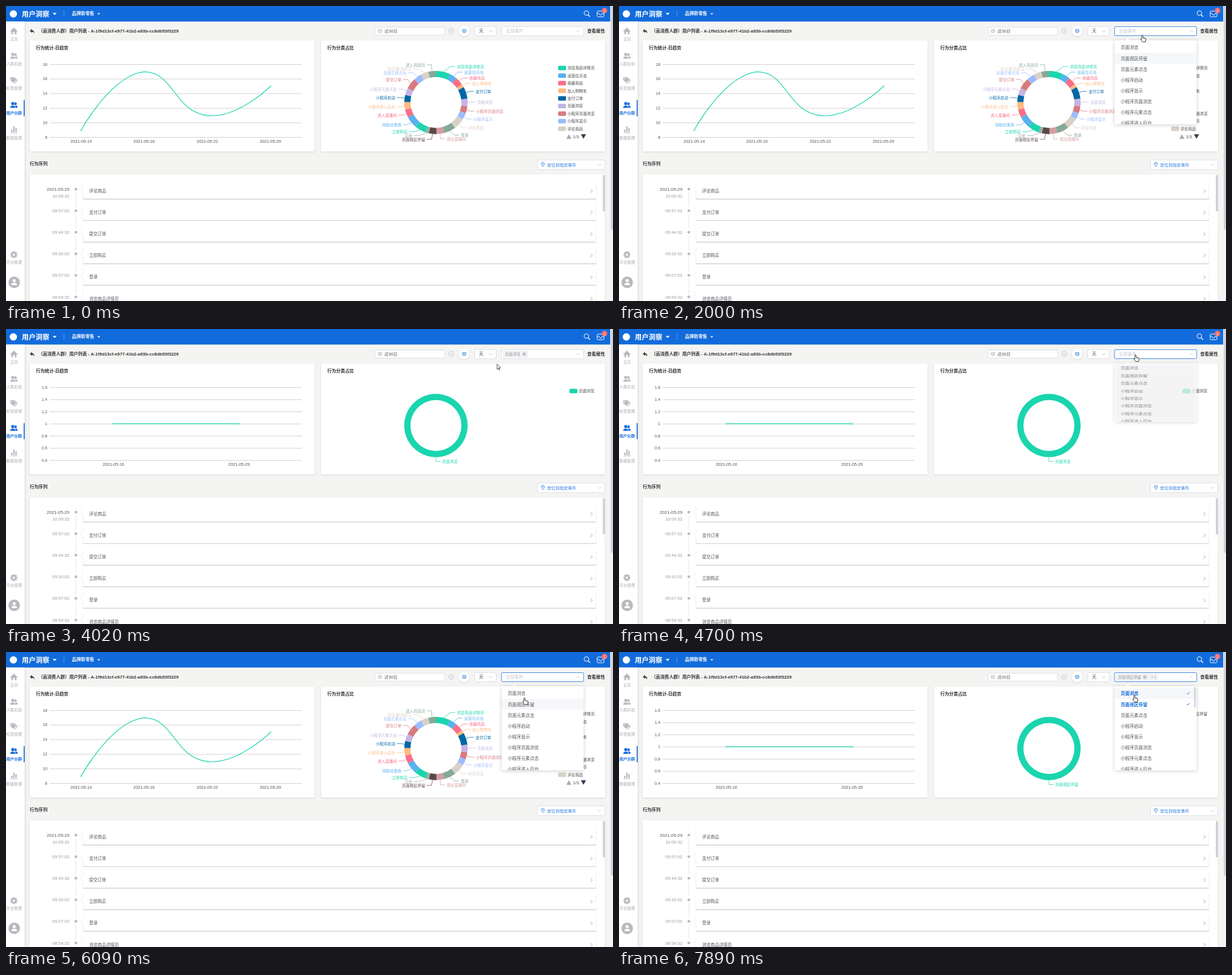
Animation of 1073x522 px, one loop 8 s. Source, as an HTML page with a canvas:

```html
<!DOCTYPE html>
<html lang="zh-CN">
<head>
<meta charset="utf-8">
<style>
html, body { margin: 0; width: 100%; height: 100%; overflow: hidden; background: #f4f4f3 }
canvas { display: block }
</style>
</head>
<body>
<canvas id="stage" width="1073" height="522"></canvas>
<script>
const c = document.getElementById('stage').getContext('2d');
const LOOP = 8000, BLUE = '#126bdb', TEAL = '#1ad5ae', GREY = '#b8babd', TEXT = '#505256';
const FONT = '"Liberation Sans", "Noto Sans CJK SC", "Noto Sans CJK", sans-serif';

const lerp = (a, b, p) => a + (b - a) * p;
const clamp = p => Math.max(0, Math.min(1, p));
const smooth = p => p * p * (3 - 2 * p);
const cubicOut = (t, start) => 1 - (1 - clamp((t - start) / 300)) ** 3;

function text(s, x, y, size, color, align = 'left', weight = 400) {
  c.font = `${weight} ${size}px ${FONT}`;
  c.textAlign = align;
  c.fillStyle = color;
  c.fillText(s, x, y + size * .37);
}
function rect(x, y, w, h, fill, r = 0, stroke) {
  c.beginPath();
  c.roundRect(x, y, w, h, r);
  if (fill) { c.fillStyle = fill; c.fill(); }
  if (stroke) { c.strokeStyle = stroke; c.lineWidth = 1; c.stroke(); }
}
function circle(x, y, r, fill, stroke, width = 1) {
  c.beginPath();
  c.arc(x, y, r, 0, 7);
  if (fill) { c.fillStyle = fill; c.fill(); }
  if (stroke) { c.strokeStyle = stroke; c.lineWidth = width; c.stroke(); }
}
function path(d, x, y, fill, stroke, width = 1) {
  const p = new Path2D(d);
  c.save();
  c.translate(x, y);
  if (fill) { c.fillStyle = fill; c.fill(p); }
  if (stroke) { c.strokeStyle = stroke; c.lineWidth = width; c.stroke(p); }
  c.restore();
}
function shadowed(blur, color, draw) {
  c.save();
  c.shadowBlur = blur;
  c.shadowColor = color;
  c.shadowOffsetY = 1;
  draw();
  c.restore();
}
const chevron = (x, y, up) => path(up ? 'M-3 1.5L0-1.5L3 1.5' : 'M-3-1.5L0 1.5L3-1.5', x, y, null, '#c0c4cc', .9);
const card = (x, y, w, h) => shadowed(3, 'rgba(0,0,0,.13)', () => rect(x, y, w, h, '#fff', 1));
const calendar = (x, y, color) => {
  rect(x - 3, y - 2.5, 6, 5, null, .5, color);
  path('M-3-.6H3M-1.5 1H1.5', x, y, null, color, .7);
};

// ---- static page ----
function people(x, y, color) {
  circle(x + 2.5, y - 2, 2.5, color);
  path('M2 5Q2 1 4 1Q6.5 1.5 6.5 5Z', x, y, color);
  circle(x - 2, y - 2.3, 3.2, color, '#fff', .7);
  path('M-7 5.5Q-6.5 1 -2 1Q2.5 1 3 5.5Z', x, y, color, '#fff', .5);
}
function header() {
  rect(0, 0, 1068, 27.5, BLUE);
  circle(13, 14, 6.5, '#fff');
  text('用户洞察', 28, 14, 12.2, '#fff', 'left', 700);
  path('M-3.5-1.7H3.5L0 2Z', 86, 14, '#fff');
  rect(102, 8, 1, 11, '#5a98e8');
  text('品牌新零售', 116.5, 13.5, 7.9, '#fff', 'left', 700);
  path('M-2.5-1.2H2.5L0 1.5Z', 164, 14, '#fff');
  circle(1026, 12.5, 4, null, '#fff', 1.1);
  path('M0 0L3.5 3.5', 1029, 15.5, null, '#fff', 1.5);
  rect(1045, 9, 12, 10, null, 1.5, '#fff');
  path('M0 0H3Q4 3 6 3Q8 3 9 0H12', 1045, 13, null, '#fff');
  circle(1058, 8, 5, '#f56c6c');
  text('1', 1058, 8, 7, '#fff', 'center');
}
function sidebar() {
  shadowed(4, 'rgba(0,0,0,.2)', () => rect(0, 27.5, 33, 500, '#fff'));
  path('M-7 1L0-6L7 1H4.5V6H1.5V2H-1.5V6H-4.5V1Z', 14, 44, GREY);
  people(14, 88, GREY);
  path('M-5.5-5H0L5 0L0 5L-5.5 0Z', 13, 131, GREY);
  path('M1-5L7 .5L2 6', 13, 131, null, GREY, 1.2);
  circle(10, 128.5, 1, '#fff');
  people(14, 175, BLUE);
  path('M-6 6H6V5H-6ZM-5 4V0H-2.5V4ZM-1.2 4V-6H1.2V4ZM2.5 4V-3H5V4Z', 14, 219, GREY);
  c.save();
  c.translate(14, 440);
  for (let i = 0; i < 8; i++) { c.rotate(Math.PI / 4); rect(-1.4, -6.3, 2.8, 4, GREY); }
  c.restore();
  circle(14, 440, 3.3, null, GREY, 2.8);
  circle(14.5, 489, 10.2, GREY);
  circle(14.5, 486, 2.8, '#fff');
  path('M-5 5Q-5 .7 0 .7Q5 .7 5 5Z', 14.5, 489, '#fff');
  [['主页', 58], ['人群实验', 102], ['标签管理', 145.5], ['用户分群', 189], ['数据管理', 233], ['平台管理', 453.5]]
    .forEach(([s, y]) => text(s, 14.3, y, 6.9, y == 189 ? BLUE : '#aaa', 'center', y == 189 ? 700 : 400));
  rect(31.3, 166.5, 1.7, 28.5, BLUE);
}
function toolbar() {
  path('M-4-1L0-4.5V-2.2Q4-2 4 3.2Q2.5.5 0 .5V2.6Z', 46, 45, '#444');
  text('（高消费人群）用户列表', 57.2, 44, 7.8, '#333', 'left', 700);
  text('- A-1f9d13cf-e977-41b2-a93b-cc8db53f3229', 145, 44, 7.85, '#333', 'left', 700);
  rect(652.5, 37.5, 123, 14, '#fff', 1.5, '#dcdfe6');
  calendar(661, 44, '#b4b8c0');
  text('近30日', 669, 44.3, 7.4, TEXT);
  circle(787, 44, 4.6, null, '#c0c4cc', .9);
  path('M-1.8-1.8L1.8 1.8M1.8-1.8L-1.8 1.8', 787, 44, null, '#c0c4cc', .9);
  shadowed(3, 'rgba(0,0,0,.12)', () => circle(810, 44, 9.5, '#fff'));
  calendar(810, 44, '#3c86e4');
  rect(828.5, 36.5, 38, 16, '#fff', 1.5, '#dcdfe6');
  text('天', 836, 44.3, 8, TEXT);
  chevron(857, 44.5);
  text('查看属性', 1027.5, 44.3, 7.8, '#333', 'left', 700);
}
function timeline() {
  text('行为序列', 42, 279, 7.8, '#333', 'left', 700);
  rect(939.5, 272.5, 119, 17, '#fff', 1.5, '#dcdfe6');
  path('M0 4Q-3 .5-3-1A3 3 0 0 1 3-1Q3 .5 0 4Z', 949, 280.5, null, '#3c86e4', .9);
  circle(949, 279.5, 1, null, '#3c86e4', .7);
  text('定位到指定事件', 956.5, 281, 7.35, '#2b78df');
  chevron(1049.5, 281);
  card(42, 298, 1016.5, 240);
  rect(123, 317, 1, 205, '#e2e5ea');
  text('2021-05-29', 112, 324, 7.8, TEXT, 'right');
  [['10:09:32', '评论商品'], ['09:57:02', '支付订单'], ['09:44:32', '提交订单'], ['09:32:02', '立即购买'],
   ['09:07:02', '登录'], ['08:54:32', '浏览商品详情页']].forEach(([time, name], i) => {
    const y = 324 + 38.15 * i;
    rect(121, y - 6, 5, 12, '#fff');
    circle(123.5, y, 2.5, '#bcbec2');
    text(time, 112, i ? y : y + 12, 7.7, '#999', 'right');
    path('M0-10V-4.5L-4.5 0L0 4.5V17M907-10V17', 136, y, null, '#ebebeb', .8);
    rect(136, y + 17, 907, 1.2, '#c9c9c9');
    text(name, 147, y + 3, 7.5, TEXT);
    path('M-1.5-3L1.5 0L-1.5 3', 1035, y + 3.3, null, '#999', .9);
  });
  rect(1055, 299, 3.7, 64.5, '#cdd0d6', 2);
}

// ---- line chart ----
const ALL = [[133, 219.5], [244, 116.4], [356, 193.8], [467.3, 142.2]];
const ONE = [[190, 167.6], [412, 167.6]];
const DATES = ['2021-05-14', '2021-05-16', '2021-05-22', '2021-05-29'];
const mix = (a, b, p) => [lerp(a[0], b[0], p), lerp(a[1], b[1], p)];

function curve(pts) {
  const low = v => Math.max(116.4, Math.min(219.5, v));
  let [ax, ay] = pts[0];
  c.beginPath();
  c.moveTo(ax, ay);
  for (let i = 1; i < pts.length; i++) {
    const p = pts[i], q = pts[i - 1], n = pts[i + 1];
    if (!n) { c.bezierCurveTo(ax, ay, ...p, ...p); break; }
    const before = Math.hypot(p[0] - q[0], p[1] - q[1]), after = Math.hypot(n[0] - p[0], n[1] - p[1]);
    const k = after / (after + before) / 2, vx = n[0] - q[0], vy = n[1] - q[1];
    c.bezierCurveTo(ax, ay, p[0] - vx * (.5 - k), low(p[1] - vy * (.5 - k)), ...p);
    ax = p[0] + vx * k;
    ay = low(p[1] + vy * k);
  }
  c.strokeStyle = TEAL;
  c.lineWidth = 1.2;
  c.stroke();
}
function lineChart(all, p) {
  const steps = all ? 5 : 6;
  for (let i = 0; i <= steps; i++) {
    const y = 103.5 + 129 * i / steps;
    rect(77.5, y - .5, 445.5, 1, '#d0d0d0');
    text(all ? 18 - 2 * i : +(1.6 - .2 * i).toFixed(1), 73, y - .5, 7.2, TEXT, 'right');
  }
  const date = (s, x) => text(s, x, 239.5, 7.4, TEXT, 'center');
  const dot = ([x, y], r = 1.4) => circle(x, y, r, '#fff', TEAL, .8);
  if (all) {
    const pts = ALL.map((q, i) => i % 2 ? mix(ONE[i >> 1], q, p) : q);
    curve(pts);
    pts.forEach(q => dot(q));
    DATES.forEach((s, i) => date(s, i < 2 ? lerp(ONE[i][0], ALL[i][0], p) : ALL[i][0]));
  } else {
    const pts = ONE.map((q, i) => mix(ALL[2 * i + 1], q, p));
    curve(pts);
    pts.forEach(q => dot(q));
    if (p < 1) [ALL[0], ALL[2]].forEach(q => dot(q, 1 - p));
    [DATES[1], DATES[3]].forEach((s, i) => date(s, lerp(ALL[i][0], ONE[i][0], p)));
  }
}

// ---- donut chart ----
const COLORS = [TEAL, '#5ab1ef', '#fa6e86', '#ffb980', '#0067a6', '#c4b4e4', '#d87a80', '#9cbbff', '#d9d0c7',
  '#87a997', '#d49ea2', '#5b4947', '#9cae a6'.replace(' ', '')];
// name, end angle in degrees clockwise from the top, label x and y
const SLICES = [
  ['浏览商品详情页', 27, 797, 107], ['运营位点击', 40, 810, 117], ['收藏商品', 55, 819, 127.5],
  ['加入购物车', 61, 824, 137], ['支付订单', 83, 830, 151], ['页面浏览', 97, 833, 170],
  ['小程序页面浏览', 110, 831, 186], ['小程序显示', 122, 826, 200], ['评论商品', 143, 817, 215.5],
  ['登录', 165, 804, 228.5], ['退出直播间', 179, 779, 235], ['页面视区停留', 193, 741, 236],
  ['注册', 199, 718, 229.5], ['立即购买', 220, 710, 222.5], ['领取优惠券', 242, 699, 210],
  ['进入直播间', 257, 691, 193], ['小程序进入后台', 271, 688, 178], ['小程序启动', 284, 688, 162],
  ['小程序元素点击', 297, 691, 147], ['提交订单', 317, 699, 130], ['页面元素点击', 332, 708, 118],
  ['关注/取消关注', 346, 717, 111], ['进入商品页', 360, 741, 104]];
const N = SLICES.length, CX = 760, CY = 170.7;

function slot(k) {
  const i = k % N, turn = k < N ? 0 : 360, s = SLICES[i];
  return { a: (i ? SLICES[i - 1][1] : 0) + turn, b: s[1] + turn, x: s[2], y: s[3], side: s[2] > CX ? 1 : -1 };
}
const blend = (f, g, p) => ({
  a: lerp(f.a, g.a, p), b: lerp(f.b, g.b, p), x: lerp(f.x, g.x, p), y: lerp(f.y, g.y, p), side: g.side
});
function slice(name, s, color) {
  const rad = d => (d - 90) * Math.PI / 180, mid = rad((s.a + s.b) / 2);
  c.beginPath();
  c.moveTo(CX + 56 * Math.cos(mid), CY + 56 * Math.sin(mid));
  c.lineTo(s.x - 11 * s.side, s.y);
  c.lineTo(s.x - 3 * s.side, s.y);
  c.strokeStyle = color;
  c.lineWidth = .8;
  c.stroke();
  text(name, s.x, s.y, 6.86, color, s.side > 0 ? 'left' : 'right');
  c.beginPath();
  c.arc(CX, CY, 56, rad(s.a), rad(s.b));
  c.arc(CX, CY, 45, rad(s.b), rad(s.a), true);
  c.fillStyle = color;
  c.fill();
}
const FULL = { a: 0, b: 360, x: 771, y: 234.5, side: 1 };

function legend(names, x) {
  names.forEach((name, i) => {
    const y = 109.7 + 13.45 * i;
    rect(x, y - 4, 14, 8, COLORS[i], 2);
    text(name, x + 16.5, y, 6.86, '#444');
  });
}
function donut(t, all, p) {
  if (!all) {
    const late = t >= 6820, name = SLICES[late ? 11 : 5][0];
    slice(name, blend(slot(late ? 16 : 5), FULL, p), TEAL);
    legend([name], 1023.5 - 6.86 * name.length);
    return;
  }
  const turn = cubicOut(t, 6430);
  SLICES.forEach(([name], i) => {
    let s = blend(slot(i), slot(i + 5), turn);
    if (!turn) s = slot(i);
    if (p < 1) {
      if (i == 5) s = blend(FULL, s, p);
      else s.b = lerp(s.a, s.b, p);
    }
    slice(name, s, COLORS[i % 13]);
  });
  legend(SLICES.slice(0, 9).map(s => s[0]), 976);
  path('M-4.5 4L0-4L4.5 4Z', 995, 231, '#aaa');
  text('1/3', 1002.5, 231, 7.4, '#444');
  path('M-4.5-4L0 4L4.5-4Z', 1020.8, 231, '#2f3f50');
}
function charts(t) {
  card(42, 61, 503.5, 196.5);
  card(557, 61, 502, 196.5);
  text('行为统计-日趋势', 53, 74.5, 7.8, '#333', 'left', 700);
  text('行为分类占比', 568, 74.5, 7.8, '#333', 'left', 700);
  const all = t < 3390 || t >= 5580 && t < 6820;
  const p = t < 3390 ? 1 : cubicOut(t, t < 5580 ? 3390 : t < 6820 ? 5580 : 6820);
  lineChart(all, p);
  donut(t, all, p);
}

// ---- event picker ----
const OPTIONS = ['页面浏览', '页面视区停留', '页面元素点击', '小程序启动', '小程序显示', '小程序页面浏览', '小程序元素点击', '小程序进入后台'];

function picker(t) {
  const chosen = t < 2300 ? [] : t < 4510 ? [0] : t < 6330 ? [] : t < 7830 ? [1] : [1, 0];
  const open = t >= 1400 && t < 3270 || t >= 4510;
  rect(876, 36.5, 145, 16, '#fff', 1.5, open ? '#3f85e3' : '#dcdfe6');
  if (chosen.length) {
    const name = OPTIONS[chosen[0]], w = name.length * 6.86;
    rect(879.5, 39, w + 15, 11, '#f4f4f5', 1.5, '#e9e9eb');
    text(name, 882, 44.3, 6.86, '#909399');
    circle(888.5 + w, 44.3, 3.1, '#b6b9be');
    path('M-1.2-1.2L1.2 1.2M1.2-1.2L-1.2 1.2', 888.5 + w, 44.3, null, '#fff', .7);
    if (chosen[1] === 0) {
      rect(937.5, 39, 15, 11, '#f4f4f5', 1.5, '#e9e9eb');
      text('+ 1', 945, 44.3, 6.86, '#909399', 'center');
    }
  } else text('全部事件', 884, 44.3, 7.5, '#c0c4cc');
  chevron(1011.5, 44.5, open);

  const show = t < 3270 ? smooth(clamp((t - 1400) / 300))
    : t < 4510 ? 1 - smooth(clamp((t - 3270) / 300)) : smooth(clamp((t - 4510) / 300));
  if (!show) return;
  const hover = t < 2090 ? 1 : t < 6000 ? 0 : t < 7540 ? 1 : 0;
  c.save();
  c.globalAlpha = show;
  c.translate(0, 60);
  c.scale(1, show);
  c.translate(0, -60);
  shadowed(6, 'rgba(0,0,0,.2)', () => rect(876, 60.5, 145, 149, '#fff', 2));
  path('M-4 4.5L0 0L4 4.5Z', 899, 56.5, '#fff');
  c.beginPath();
  c.rect(876, 60, 145, 149.5);
  c.clip();
  OPTIONS.forEach((name, i) => {
    const y = 73.5 + 19.1 * i, on = chosen.includes(i);
    if (i == hover) rect(876, y - 9.6, 145, 19.1, '#f5f7fa');
    text(name, 887, y, 7.85, on ? BLUE : TEXT, 'left', on ? 700 : 400);
    if (on) path('M-2.5 0L-.7 1.8L2.7-1.8', 1006, y - .5, null, BLUE, 1);
  });
  if (chosen.length) rect(1016.5, 62, 3.2, 36.5, '#d5d7db', 1.6);
  c.restore();
}

// ---- pointer: time, x, y ----
const MOVES = [[520, 1066, 512], [760, 880, 250], [900, 828, 132], [1060, 938, 80], [1300, 925, 51], [2000, 925, 51],
  [2130, 919, 70], [2840, 919, 70], [3130, 868, 62], [4020, 868, 62], [4340, 913, 45], [5650, 913, 45],
  [6250, 917, 88], [7420, 917, 88], [7650, 911, 76], [8000, 911, 76]];

function pointer(t) {
  if (t < 520) return;
  const i = MOVES.findIndex(m => m[0] > t), from = MOVES[i - 1], to = MOVES[i];
  const p = smooth((t - from[0]) / (to[0] - from[0]));
  const x = lerp(from[1], to[1], p), y = lerp(from[2], to[2], p);
  const hand = x > 876 && x < 1021 && (y > 36 && y < 53 || t > 1400 && t < 3270 || t > 4510);
  if (hand) {
    path('M2 1.2Q3-.3 4 1.2V5L8.3 6Q9.5 6.5 9.3 8L8.5 12.5H3.5L.2 8Q0 6.8 1 6.8L2 7.8Z', x - 3, y, '#fff', '#222', .9);
    path('M5.5 5.4V7M7.3 5.8V7.2', x - 3, y, null, '#222', .6);
  } else path('M0 0V9.2L2.1 7.3L3.6 10.6L5 9.9L3.6 6.8H6.4Z', x, y, '#fff', '#222', .8);
}

function draw(now) {
  const t = now % LOOP;
  rect(0, 0, 1073, 522, '#f4f4f3');
  header();
  sidebar();
  toolbar();
  charts(t);
  timeline();
  rect(1068, 0, 5, 522, '#f4f4f4');
  rect(1069, 0, 4, 396, '#cfd1d6', 2);
  picker(t);
  pointer(t);
  requestAnimationFrame(draw);
}
requestAnimationFrame(draw);
</script>
</body>
</html>
```
